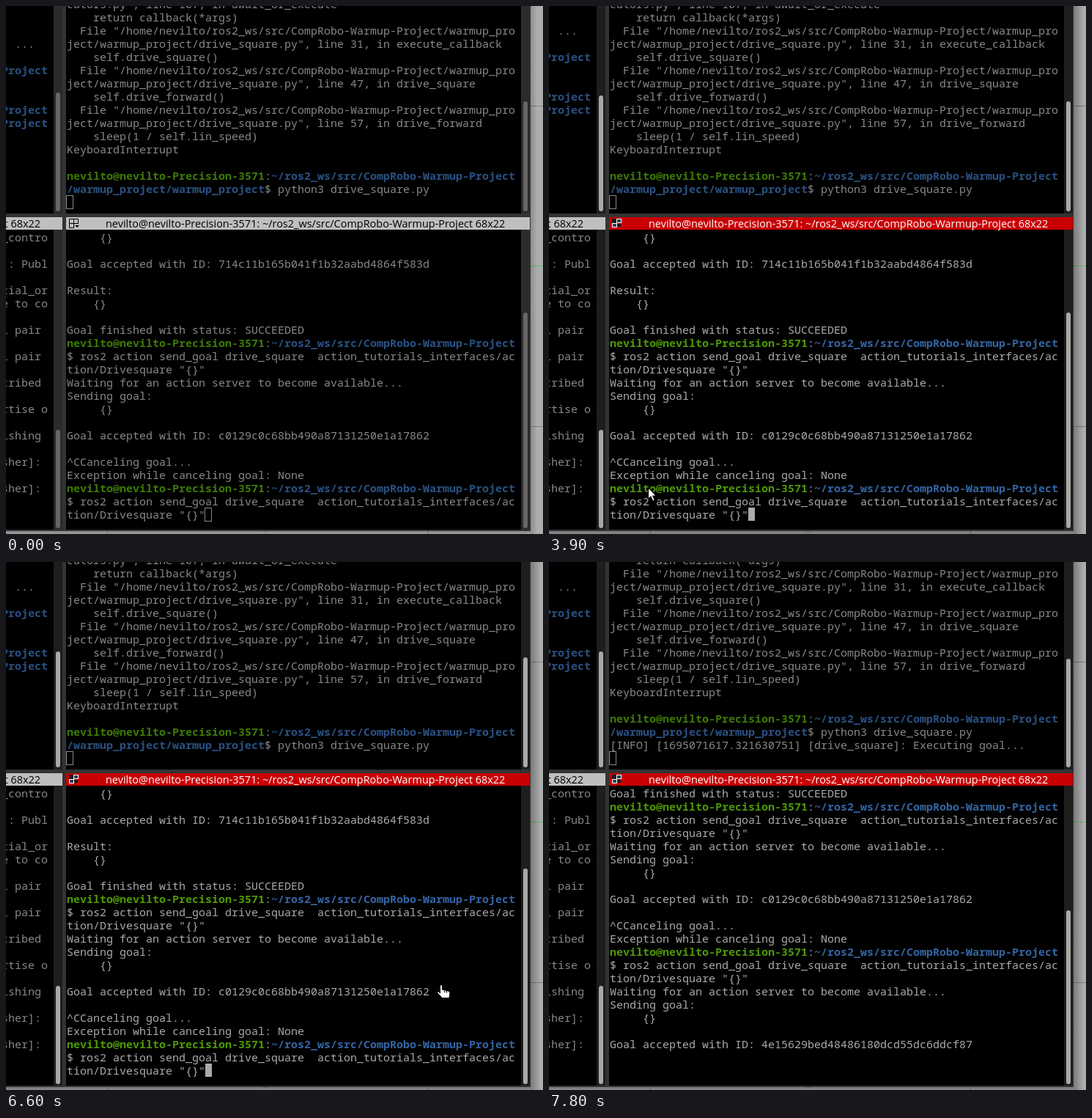
Write an HTML page with a canvas that moves like this. It is 733 by 720 pixels and loops after 8 s.

```html
<!DOCTYPE html>
<html lang="en">
<head>
<meta charset="utf-8">
<title>Terminal panes</title>
<style>
html, body { margin: 0; width: 100%; height: 100%; overflow: hidden; background: #000; }
canvas { display: block; }
</style>
</head>
<body>
<canvas id="stage" width="733" height="720"></canvas>
<script>
const ctx = document.getElementById('stage').getContext('2d');
const LOOP = 8000, CELL = 9, LINE = 18;
const MONO = '15px "Noto Sans Mono", "DejaVu Sans Mono", monospace';
const SANS = '14.45px "Open Sans", "Noto Sans", sans-serif';

const BRIGHT = { fg: '#aaaaaa', green: '#4e9a06', blue: '#3465a4' };
const DIM = { fg: '#888888', green: '#3e7b05', blue: '#2a5183' };

const USER = 'nevilto';
const HOST = USER + '@' + USER + '-Precision-3571';
const CWD = '~/ros2_ws/src/CompRobo-Warmup-Project';
const TITLE = HOST + ': ' + CWD + ' 68x22';

// A line is a string or a list of [text, colour key] runs.
const prompt = [[HOST, 'green'], [':', 'fg'], [CWD, 'blue']];
const file = '  File "/home/' + USER + '/ros2_ws/src/CompRobo-Warmup-Project/warmup_pro';
const at = (line, fn) => 'ject/warmup_project/drive_square.py", line ' + line + ', in ' + fn;
const send = [
  prompt,
  '$ ros2 action send_goal drive_square  action_tutorials_interfaces/ac',
  'tion/Drivesquare "{}"'
];
const wait = ['Waiting for an action server to become available...', 'Sending goal:', '     {}', ''];
const accepted = id => 'Goal accepted with ID: ' + id;

const serverLog = [
  'cutors.py", line 107, in await_or_execute',
  '    return callback(*args)',
  file, at(31, 'execute_callback'), '    self.drive_square()',
  file, at(47, 'drive_square'), '    self.drive_forward()',
  file, at(57, 'drive_forward'), '    sleep(1 / self.lin_speed)',
  'KeyboardInterrupt', '',
  prompt,
  [['/warmup_project/warmup_project', 'blue'], ['$ python3 drive_square.py', 'fg']]
];
const serverInfo = '[INFO] [1695071617.321630751] [drive_square]: Executing goal...';

const clientLog = [
  '     {}', '',
  accepted('714c11b165b041f1b32aabd4864f583d'), '',
  'Result:', '    {}', '',
  'Goal finished with status: SUCCEEDED',
  ...send, ...wait,
  accepted('c0129c0c68bb490a87131250e1a17862'), '',
  '^CCanceling goal...',
  'Exception while canceling goal: None',
  ...send
];
const clientReply = [...wait, accepted('4e15629bed48486180dcd55dc6ddcf87')];

const blue = [['Project', 'blue']];
const buildLog = [') ...', '', blue, '', '', blue, blue];
const nodeLog = [
  '_contro', '', ']: Publ', '', 'tial_or', 'e to co', '', 'l pair', '', 'l pair', '',
  'cribed', '', 'rtise o', '', 'ishing', '', 'sher]:', '', 'sher]:'
];

// Pointer paths: [time, x, y] of the hot spot, updated in 100 ms ticks.
const enterPath = [[600, 20, 668], [700, 75, 662], [800, 118, 658], [900, 135, 656]];
const leavePath = [
  [5900, 135, 656], [6000, 152, 648], [6100, 210, 620], [6200, 300, 582], [6300, 400, 556],
  [6400, 490, 549], [6500, 562, 563], [6600, 594, 576], [6800, 594, 576], [6900, 625, 568]
];

function rect(x, y, w, h, color) {
  ctx.fillStyle = color;
  ctx.fillRect(x, y, w, h);
}

function inPane(x, y, w, h, draw) {
  ctx.save();
  ctx.beginPath();
  ctx.rect(x, y, w, h);
  ctx.clip();
  draw();
  ctx.restore();
}

function drawLines(lines, x, top, colors) {
  lines.forEach((line, i) => {
    let col = 0;
    const runs = typeof line === 'string' ? [[line, 'fg']] : line;
    for (const [text, key] of runs) {
      ctx.font = (key === 'fg' ? '' : 'bold ') + MONO;
      ctx.fillStyle = colors[key];
      ctx.fillText(text, x + col * CELL, top + i * LINE + 15);
      col += text.length;
    }
  });
}

function hollowCursor(x, y) {
  ctx.strokeStyle = DIM.fg;
  ctx.lineWidth = 1;
  ctx.strokeRect(x + 0.5, y + 0.5, CELL, LINE);
}

function thumb(x, y, bottom, active) {
  ctx.fillStyle = active ? '#a9a9a9' : '#666666';
  ctx.beginPath();
  ctx.roundRect(x, y, 6, bottom - y, 3);
  ctx.fill();
}

function backdrop(active) {
  rect(0, 0, 733, 720, '#aeaeae');
  for (const y of [136, 573]) rect(715, y, 18, 1, '#7d7d7d');
  for (const x of [138, 575]) rect(x, 714, 1, 6, '#7d7d7d');
  rect(715, 354, 18, 1, '#4fc24f');
  rect(350, 716, 8, 1, '#6fa86f');
  const reach = active ? 14 : 9, dark = active ? 0.3 : 0.2;
  const shade = (x0, y0, x1, y1) => {
    const g = ctx.createLinearGradient(x0, y0, x1, y1);
    g.addColorStop(0, 'rgba(0,0,0,' + dark + ')');
    g.addColorStop(1, 'rgba(0,0,0,0)');
    return g;
  };
  rect(716, 0, 17, 720, shade(716, 0, 716 + reach, 0));
  rect(0, 716, 716, 4, shade(0, 716, 0, 716 + reach));
}

function titleBar(x, w, focused) {
  rect(x, 288, w, 17, focused ? '#c80003' : '#c0bebf');
  ctx.fillStyle = focused ? '#ffffff' : '#000000';
  ctx.font = SANS;
}

function groupIcon(focused) {
  if (focused) {
    rect(86, 290, 7, 7, '#1c1c1c');
    rect(92, 290, 7, 6, '#ffffff');
    rect(93, 291, 5, 4, '#25405f');
    rect(86, 296, 7, 6, '#ffffff');
    rect(87, 297, 5, 4, '#25405f');
    rect(93, 297, 5, 4, '#1c1c1c');
    return;
  }
  ctx.strokeStyle = '#000000';
  ctx.lineWidth = 1;
  ctx.beginPath();
  ctx.moveTo(92.5, 302.5);
  ctx.lineTo(86.5, 302.5);
  ctx.lineTo(86.5, 290.5);
  ctx.lineTo(98.5, 290.5);
  ctx.lineTo(98.5, 297);
  ctx.moveTo(86.5, 296.5);
  ctx.lineTo(98.5, 296.5);
  ctx.moveTo(92.5, 290.5);
  ctx.lineTo(92.5, 302.5);
  ctx.stroke();
  ctx.fillStyle = '#000000';
  ctx.beginPath();
  ctx.moveTo(94, 299);
  ctx.lineTo(100, 299);
  ctx.lineTo(97, 302);
  ctx.fill();
}

function along(path, t) {
  let i = 1;
  while (i < path.length - 1 && path[i][0] < t) i++;
  const [t0, x0, y0] = path[i - 1], [t1, x1, y1] = path[i];
  const k = Math.max(0, Math.min(1, (t - t0) / (t1 - t0)));
  return [x0 + (x1 - x0) * k, y0 + (y1 - y0) * k];
}

function drawPointer(t) {
  if (t < 600 || t >= 7000) return;
  const [x, y] = along(t < 3000 ? enterPath : leavePath, t);
  const hand = t >= 6600 && t < 6900;
  ctx.save();
  ctx.translate(x, y);
  ctx.lineJoin = 'round';
  ctx.fillStyle = '#ffffff';
  ctx.strokeStyle = '#000000';
  ctx.lineWidth = 1.2;
  const shape = new Path2D(hand
    ? 'M-1.5 1.5Q0 -.5 1.5 1.5V7L10 9Q12.5 10 12 13L11 18.5H1L-5.5 11.5Q-5.5 9 -3 10L-1.5 11.5Z'
    : 'M.5 .5V16.5L4 13L6.7 19.3L9.4 18L6.8 12H11.5Z');
  ctx.fill(shape);
  ctx.stroke(shape);
  if (hand) ctx.stroke(new Path2D('M4.5 8.5V11M7.5 9V11.5'));
  ctx.restore();
}

function draw(t) {
  const active = t >= 500;
  const leftFocus = active && t < 3900, rightFocus = t >= 3900;
  const entered = t >= 7200, running = t >= 7800;
  const track = active ? '#1e1e1e' : '#2b2b2b';

  backdrop(active);
  rect(0, 0, 716, 716, '#333333');
  for (const [x, w] of [[0, 77], [82, 633]]) {
    rect(x, 0, w, 283, '#000000');
    rect(x, 305, w, 409, '#000000');
    rect(x + w - 12, 0, 12, 283, track);
    rect(x + w - 12, 305, 12, 409, track);
  }

  inPane(0, 0, 65, 283, () => drawLines(buildLog, -6, t < 100 ? 42 : 24, DIM));
  inPane(0, 305, 65, 409, () => drawLines(nodeLog, -6, 306, leftFocus ? BRIGHT : DIM));

  inPane(82, 0, 621, 283, () => {
    drawLines(running ? [...serverLog, serverInfo] : serverLog, 83, running ? -30 : -12, DIM);
    hollowCursor(82, 258);
  });

  inPane(82, 305, 621, 409, () => {
    const scroll = running ? 7 : entered ? 1 : 0;
    const lines = running ? [...clientLog, ...clientReply] : clientLog;
    drawLines(lines.slice(scroll), 83, 306, rightFocus ? BRIGHT : DIM);
    const x = entered ? 83 : 272;
    if (!rightFocus) hollowCursor(x - 1, 684);
    else if (Math.floor((t - (entered ? 7200 : 3900)) / 600) % 2 === 0) {
      rect(x, 684, CELL, LINE, BRIGHT.fg);
    }
  });

  thumb(68, t < 100 ? 118 : 122, 280, active);
  thumb(68, 578, 712, active);
  thumb(706, running ? 132 : 130, 280, active);
  thumb(706, running ? 475 : entered ? 428 : 418, 712, active);

  titleBar(0, 77, leftFocus);
  ctx.textAlign = 'right';
  ctx.fillText('Project 68x22', 47, 302);
  ctx.textAlign = 'left';
  titleBar(82, 633, rightFocus);
  ctx.fillText(TITLE, 136, 302);
  groupIcon(rightFocus);

  drawPointer(t);
}

function tick(now) {
  draw(Math.floor((now % LOOP) / 100) * 100);
  requestAnimationFrame(tick);
}
draw(0);
requestAnimationFrame(tick);
</script>
</body>
</html>
```
